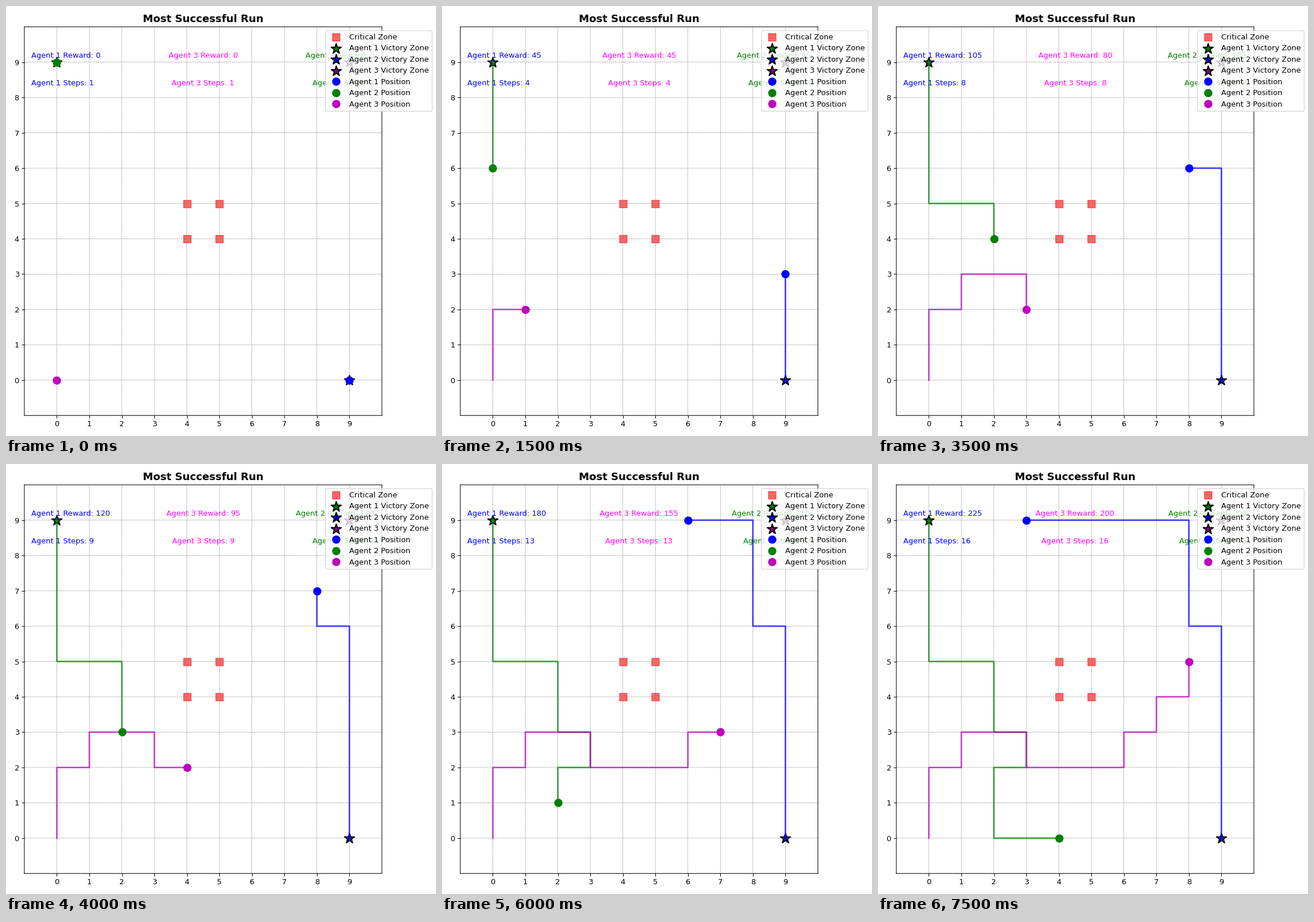
These frames come from a looping animation (748x748 px, 8000 ms). A matplotlib script:

```python
import matplotlib.pyplot as plt
from matplotlib.animation import FuncAnimation

FRAMES, INTERVAL = 16, 500
SIZE = 748
STEPS = {"U": (0, 1), "D": (0, -1), "L": (-1, 0), "R": (1, 0)}
GAIN, LOSS = 15, -10

# keep true subpixel positions
plt.rcParams["path.snap"] = False


class Agent:
    """A grid walk, rewarded for every move that nears the goal."""

    def __init__(self, start, goal, moves, color):
        self.goal, self.color = goal, color
        self.path, self.rewards = [start], [0]
        for move in moves:
            (x, y), (dx, dy) = self.path[-1], STEPS[move]
            nearer = self.gap(x + dx, y + dy) < self.gap(x, y)
            self.path.append((x + dx, y + dy))
            self.rewards.append(self.rewards[-1] + (GAIN if nearer else LOSS))

    def gap(self, x, y):
        return abs(self.goal[0] - x) + abs(self.goal[1] - y)


agents = [
    Agent((9, 0), (0, 9), "UUUUUULUUULLLLL", "b"),
    Agent((0, 9), (9, 0), "DDDDRRDDRDLDDRR", "g"),
    Agent((0, 0), (9, 9), "UURURRDRRRURURU", "m"),
]

fig, ax = plt.subplots(figsize=(8, 8), dpi=SIZE / 8)
ax.set_xlim(-1, 10)
ax.set_ylim(-1, 10)
ax.set_xticks(range(10))
ax.set_yticks(range(10))
ax.grid(True, color="gray", linestyle="--", linewidth=0.5)
ax.set_title("Most Successful Run", fontsize=14, fontweight="bold")

ax.scatter([4, 4, 5, 5], [4, 5, 4, 5], s=100, c="red", marker="s",
           alpha=0.6, label="Critical Zone")
for n, (agent, color) in enumerate(zip(agents, ("green", "blue", "purple")), 1):
    ax.scatter(*agent.goal, s=200, c=color, marker="*", edgecolors="black",
               linewidths=1.5, label=f"Agent {n} Victory Zone")

trails = [ax.plot([], [], a.color, lw=2, alpha=0.75)[0] for a in agents]
dots = [ax.plot([], [], a.color + "o", markersize=10,
                label=f"Agent {n} Position")[0]
        for n, a in enumerate(agents, 1)]


def label_pair(x, align, color):
    return [ax.text(x, y, "", transform=ax.transAxes, ha=align, color=color,
                    fontsize=10) for y in (0.92, 0.85)]


labels = [
    label_pair(0.02, "left", "blue"),
    label_pair(0.98, "right", "green"),
    label_pair(0.5, "center", "magenta"),
]

legend = ax.legend(loc="upper right", bbox_to_anchor=(1.15, 1))
fig.tight_layout()

# centre strokes on pixels
nudge = 0.4 / SIZE
ax.set_position(ax.get_position().translated(nudge, -nudge))
legend.set_bbox_to_anchor((1.151, 1), ax.transAxes)


def update(i):
    for n, agent in enumerate(agents):
        trails[n].set_data(*zip(*agent.path[:i + 1]))
        x, y = agent.path[i]
        dots[n].set_data([x], [y])
        reward, steps = labels[n]
        reward.set_text(f"Agent {n + 1} Reward: {agent.rewards[i]}")
        steps.set_text(f"Agent {n + 1} Steps: {i + 1}")
    return trails + dots + sum(labels, [])


anim = FuncAnimation(fig, update, frames=FRAMES, interval=INTERVAL,
                     init_func=lambda: update(0), repeat=True, repeat_delay=0)
plt.show()
```
